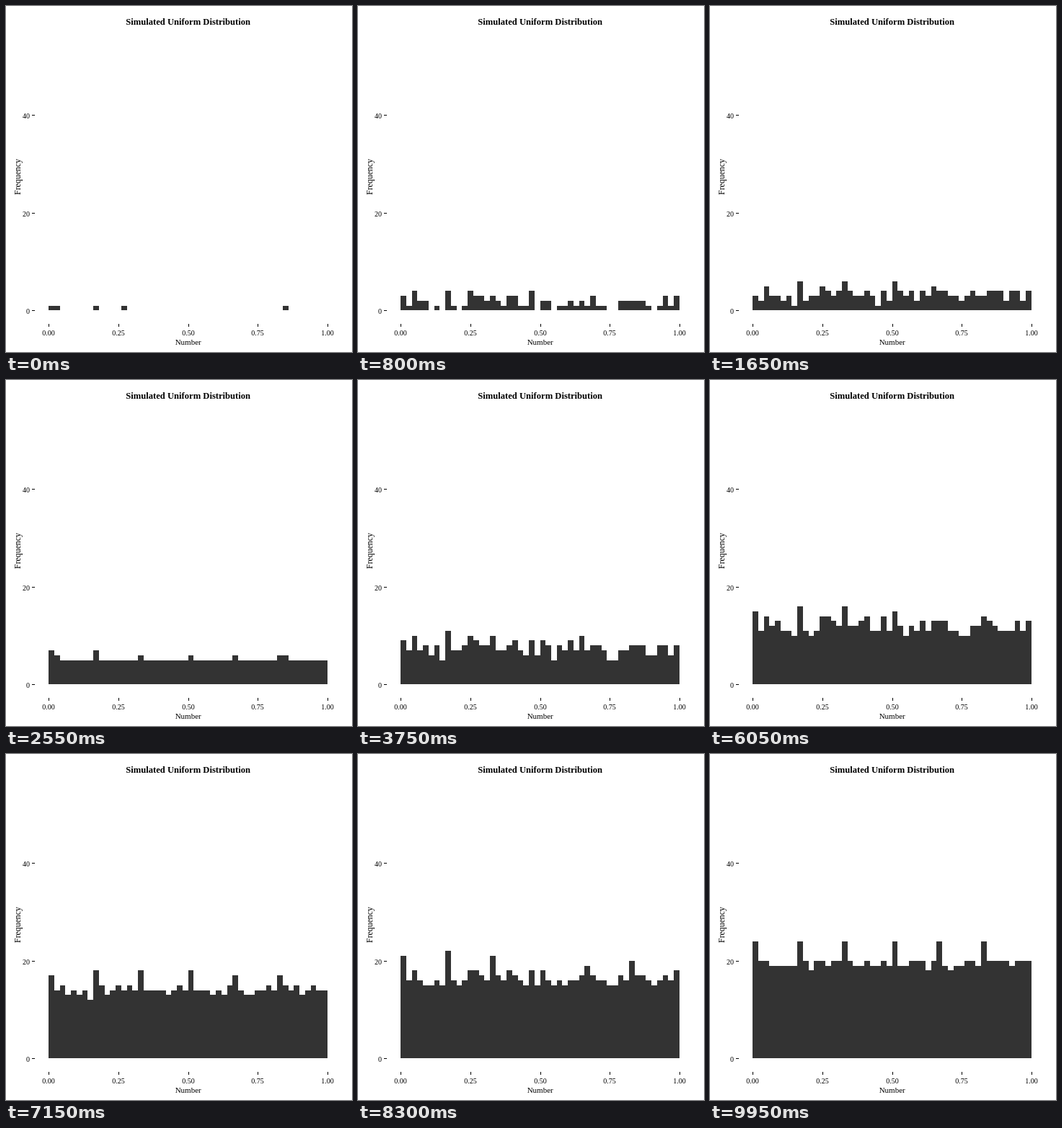
Recreate the animation shown at these times as an HTML page. Size 480x480 px, loop 10 s.

```html
<!DOCTYPE html>
<html lang="en">
<head>
<meta charset="utf-8">
<title>Simulated Uniform Distribution</title>
<style>
  html, body { margin: 0; width: 100%; height: 100%; overflow: hidden; background: #fff; }
  svg { display: block; }
  text { font: 10px "Liberation Serif", serif; text-anchor: middle; }
  .title { font-size: 12.6px; font-weight: bold; }
  .label { font-size: 11px; }
  .side { font-size: 11.8px; }
  .right { text-anchor: end; }
  path { shape-rendering: crispEdges; }
</style>
</head>
<body>
<svg width="480" height="480" viewBox="0 0 480 480">
  <text class="title" x="252.7" y="26">Simulated Uniform Distribution</text>
  <text class="label" x="252.7" y="470">Number</text>
  <text class="side" transform="translate(20 237) rotate(-90)">Frequency</text>
  <g id="axes"></g>
  <path id="bars" fill="#333"/>
</svg>
<script>
const BINS = 50, STEPS = 200, STEP_MS = 50, PER_STEP = 5, MOD = 256;
const px = v => Math.round(59.29 + 386.5 * v);
const py = n => Math.round(422.4 - 6.775 * n);

const axes = document.getElementById('axes');
const bars = document.getElementById('bars');

function add(tag, attrs, content = '') {
  const el = document.createElementNS('http://www.w3.org/2000/svg', tag);
  for (const key in attrs) el.setAttribute(key, attrs[key]);
  el.textContent = content;
  axes.append(el);
}

for (const v of [0, 0.25, 0.5, 0.75, 1]) {
  add('path', { d: `M${px(v)} 441h1v4h-1z` });
  add('text', { x: px(v), y: 457 }, v.toFixed(2));
}
for (const n of [0, 20, 40]) {
  add('path', { d: `M36 ${py(n)}h4v1h-4z` });
  add('text', { x: 33, y: py(n) + 5, class: 'right' }, n);
}

// Linear congruential generator: x -> (5x + 7) mod 256, seeded with 0.
function histogram(count) {
  const bins = new Array(BINS).fill(0);
  for (let i = 0, x = 0; i < count; i++) {
    bins[Math.floor(x * BINS / MOD)]++;
    x = (5 * x + 7) % MOD;
  }
  return bins;
}

function draw(step) {
  const d = histogram((step + 1) * PER_STEP).map((n, i) =>
    n ? `M${px(i / BINS)} ${py(0)}V${py(n)}H${px((i + 1) / BINS)}V${py(0)}z` : '');
  bars.setAttribute('d', d.join(''));
}

const start = performance.now();
let shown = -1;

function tick() {
  const step = Math.floor((performance.now() - start) / STEP_MS) % STEPS;
  if (step !== shown) draw(shown = step);
  requestAnimationFrame(tick);
}
tick();
</script>
</body>
</html>
```
